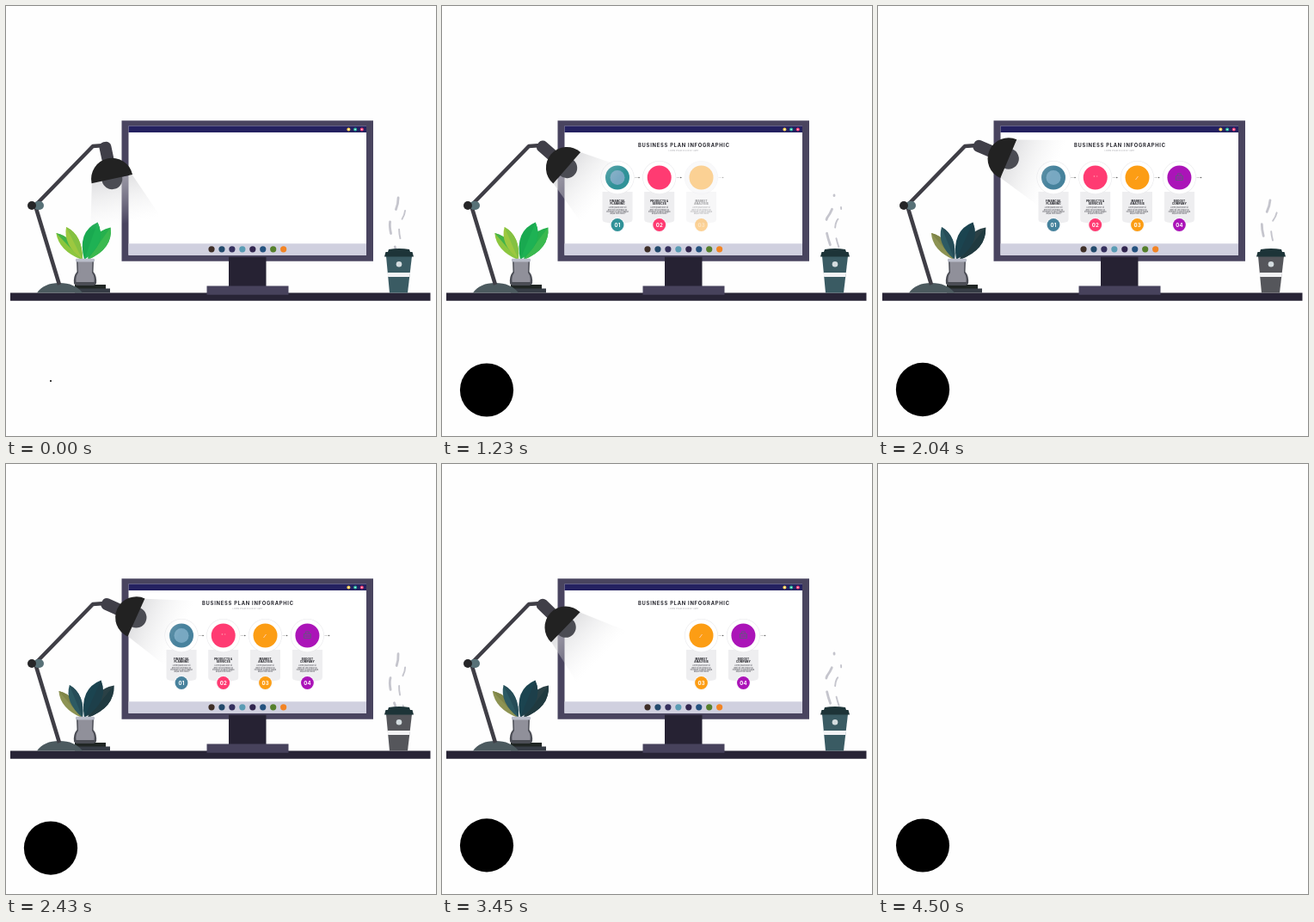
An HTML page with a canvas for the animation above (4.53 s loop, 500 by 500 pixels).

```html
<!DOCTYPE html>
<html lang="en">
<head>
<meta charset="utf-8">
<title>Desk with business plan</title>
<style>
html, body { margin: 0; width: 100%; height: 100%; overflow: hidden; background: #fefefe; }
canvas { display: block; }
</style>
</head>
<body>
<canvas id="stage" width="500" height="500"></canvas>
<script>
const ctx = document.getElementById('stage').getContext('2d');
const LOOP = 4530, CUT = 4485, TAU = Math.PI * 2;

const clamp = v => Math.max(0, Math.min(1, v));
const fade = (t, start, end) => clamp((t - start) / 240) * clamp(1 - (t - end) / 240);

// Smooth curve through [time, value] points, resting at both ends.
function curve(t, pts) {
  let i = 0;
  while (i < pts.length - 2 && t > pts[i + 1][0]) i++;
  const slope = k => k < 1 || k > pts.length - 2 ? 0
    : (pts[k + 1][1] - pts[k - 1][1]) / (pts[k + 1][0] - pts[k - 1][0]);
  const [t0, a] = pts[i], [t1, b] = pts[i + 1];
  const d = t1 - t0, u = clamp((t - t0) / d), v = 1 - u;
  return v * v * (1 + 2 * u) * a + u * u * (3 - 2 * u) * b
    + u * v * d * (v * slope(i) - u * slope(i + 1));
}

function rect(x, y, w, h, color, r = 0) {
  ctx.fillStyle = color;
  ctx.beginPath();
  ctx.roundRect(x, y, w, h, r);
  ctx.fill();
}
function disc(x, y, r, color) {
  ctx.fillStyle = color;
  ctx.beginPath();
  ctx.arc(x, y, r, 0, TAU);
  ctx.fill();
}
function shape(d, color) {
  ctx.fillStyle = color;
  ctx.fill(new Path2D(d));
}
function line(d, color, width) {
  ctx.strokeStyle = color;
  ctx.lineWidth = width;
  ctx.stroke(new Path2D(d));
}
function label(str, x, y, size, color, weight = 700, gap = 0) {
  ctx.font = `${weight} ${size}px Inter, sans-serif`;
  ctx.letterSpacing = gap + 'px';
  ctx.fillStyle = color;
  ctx.fillText(str, x + gap / 2, y);
}
function withAlpha(alpha, paint) {
  ctx.save();
  ctx.globalAlpha = alpha;
  if (alpha > 0) paint();
  ctx.restore();
}

const cards = [
  { x: 204, name: ['FINANCIAL', 'PLANNING'], color: '#45869c', start: 120, end: 2950 },
  { x: 252.7, name: ['PRODUCTS &', 'SERVICES'], color: '#ff3b72', start: 450, end: 3170 },
  { x: 301.5, name: ['MARKET', 'ANALYSIS'], color: '#fc9d14', start: 1125, end: 3570 },
  { x: 350.4, name: ['BUDGET', 'COMPANY'], color: '#ab14b8', start: 1680, end: 3860 }
];
const copy = ['Lorem ipsum dolor sit', 'amet elit sed tempor do', 'incididunt ut labore magna', 'aliqua enim minim'];
const appColors = ['#3f2f28', '#234a6c', '#35305e', '#5a9cb4', '#32264f', '#24527f', '#56802c', '#f28424'];

function card({ x, name, color }, i, t) {
  if (i === 0) {
    const mix = (a, b, d) => curve(t, [[690, a], [1230, b], [2040, d], [2820, d + 2]]);
    color = `rgb(${mix(50, 48, 70)},${mix(92, 146, 130)},${mix(140, 152, 156)})`;
  }
  shape(`M${x - 17.5} 216H${x + 17.5}V248Q${x + 17.5} 251 ${x + 14} 251.5L${x} 254L${x - 14} 251.5Q${x - 17.5} 251 ${x - 17.5} 248Z`, '#eeeef0');
  disc(x, 199.5, 19.5, '#e7e7ea');
  disc(x, 199.5, 19, '#fff');
  disc(x, 199.5, 14, color);
  if (i === 0) {
    const early = t < 960;
    disc(x, 199.5, 8.5, early ? '#2fa088' : '#78a8c2');
    if (early) {
      disc(x, 198.5, 3.2, '#8fc3bd');
      rect(x - 2.5, 201.5, 5, 2.5, '#8fc3bd', 1);
    }
  } else if (i === 3) {
    line(`M${x - 4} 197.5h8v5h-8zM${x - 2} 197v-2h4v2M${x - 4} 200h8`, '#6d4d86', 1);
  } else if (t > 1700) {
    line(i === 1 ? `M${x - 2} 198h1.5m2 0h1` : `M${x - 2} 202l3-4`, '#ffd9cf', .8);
  }
  disc(x, 254.5, 8.6, '#f8f8fa');
  disc(x, 254.5, 7.4, color);
  label('0' + (i + 1), x, 256.7, 6, '#fff', 700, .2);
  name.forEach((s, k) => label(s, x, 227.6 + k * 3.6, 3, '#26262c', 800, .15));
  copy.forEach((s, k) => label(s, x, 235.4 + k * 2.2, 2, '#55555c', 500));
  line(`M${x + 20} 199.5h4m1 0h1`, '#aaa', .5);
  disc(x + 25, 199.5, .7, '#555');
}

function monitor(t) {
  rect(5, 333.5, 488.5, 9.3, '#282436');
  rect(134.5, 133.3, 292.5, 163.5, '#49445f');
  rect(259, 291.7, 43.5, 35, '#262233');
  rect(233.5, 325.5, 95, 10.2, '#47425c');
  rect(142.5, 139.5, 276.5, 150.3, '#fff');
  rect(142.5, 139.5, 276.5, 7.5, '#242160');
  rect(142.5, 276.2, 276.5, 13.6, '#d0d0df');
  ['#ffd04a', '#22b89c', '#ff3b72'].forEach((c, i) => {
    disc(398.4 + i * 7.7, 143.5, 2, c);
    disc(398.4 + i * 7.7, 143.5, .7, '#fff');
  });
  appColors.forEach((c, i) => disc(239 + i * 11.95, 282.8, 3.6, c));

  withAlpha(fade(t, 100, 4200), () => {
    label('BUSINESS PLAN INFOGRAPHIC', 281, 163.5, 5.8, '#24242c', 700, .75);
    label('LOREM IPSUM DOLOR SIT AMET', 281, 169.2, 2.1, '#a8a8ae', 400, .1);
  });
  cards.forEach((c, i) => withAlpha(fade(t, c.start, c.end), () => card(c, i, t)));
}

// A leaf from its base to its tip, bulging by w on both sides.
function leaf(x, y, tx, ty, w, color, half) {
  const len = Math.hypot(tx - x, ty - y);
  const nx = (ty - y) / len * w, ny = (x - tx) / len * w;
  const mx = x + (tx - x) * .6, my = y + (ty - y) * .6;
  const side = s => `Q${mx + nx * s} ${my + ny * s} `;
  shape(`M${x} ${y}${side(1)}${tx} ${ty}${side(-1)}${x} ${y}`, color);
  shape(`M${x} ${y}${side(-1)}${tx} ${ty}Z`, half);
}

function plant(t) {
  const sway = k => 2 * Math.sin(t / LOOP * TAU - k);
  const dim = (t > 1800 && t < 2450) || t > 3150;
  const [left, inner, mid, right] = dim
    ? [['#8d9353', '#7f8548'], ['#2d5a63', '#264d58'], ['#1b4450', '#1d3f4a'], ['#2a4045', '#203a40']]
    : [['#8cc63f', '#41b349'], ['#9dc840', '#84c141'], ['#19a950', '#1eb254'], ['#25b04d', '#3ab94f']];
  leaf(88, 295, 60 + sway(1), 264, 12, ...left);
  leaf(89, 295, 72 + sway(1.4), 257, 13, ...inner);
  leaf(95, 295, 123.5 + sway(1.8), 257.5, 17, ...right);
  leaf(91, 295, 108.5 + sway(1.6), 251.5, 19, ...mid);
  rect(80, 324, 36, 5, '#202624');
  rect(80, 328.5, 41, 5, '#363c45');
  shape('M82 296L82.5 309Q78 314 79 323L82 325H102L105 323Q106 314 101.5 309L102 296Z', '#4b4d55');
  shape('M83.5 296L84 310Q80.5 315 81.5 321H102.5Q103.5 315 100 310L100.5 296Z', '#90909a');
  rect(81, 293.8, 22, 3.8, '#babdca', 1);
}

function lamp(t) {
  const angle = curve(t, [[0, -12], [690, -27], [1230, -49], [2040, -67], [2820, -60], [3450, -46], [LOOP, -12]]);
  shape('M36 333.5Q44 322 62 322Q80 322 89 333.5Z', '#4c5a5f');
  line('M62 324L34 232L101 163L115 162', '#3f3e46', 4.5);
  rect(32, 227, 12, 10, '#587177', 5);
  disc(30, 232, 5, '#262628');

  ctx.save();
  ctx.translate(115, 162);
  ctx.rotate(angle * Math.PI / 180);
  const glow = ctx.createLinearGradient(0, 40, 0, 94);
  glow.addColorStop(0, 'rgba(205,205,208,.6)');
  glow.addColorStop(1, 'rgba(235,235,236,0)');
  shape('M-24 40H24L46 94H-37Z', glow);
  rect(-7, -4, 14, 26, '#403f48', 6);
  disc(0, 40, 12, '#4b4c53');
  shape('M-24.3 40A24.3 24.3 0 0 1 24.3 40Z', '#222222');
  ctx.restore();
}

function steam(d, width, on, period, offset, t) {
  ctx.setLineDash([on, period - on]);
  ctx.lineDashOffset = offset - t / LOOP * 2 * period;
  line(d, '#c5c5cd', width);
  ctx.setLineDash([]);
}

function cup(t) {
  const gray = t > 1800 && t < 2450;
  ctx.lineCap = 'round';
  steam('M453 282Q443 256 448 246Q457 234 456 220', 2.8, 14, 30, 12, t);
  steam('M462 282Q454 260 459 250Q465 242 464 234', 1.9, 10.5, 23.2, 11, t);
  ctx.lineCap = 'butt';
  shape('M442 291H472L467 333.5H446Z', gray ? '#55565b' : '#3a5b63');
  shape('M443.5 310H470L469.4 315H444.2Z', '#f2f2f4');
  shape('M445 283Q457 281 469 283L470 286H472.5L474 291.5H440L441.5 286H444Z', '#1d3438');
  disc(457, 300.3, 3.3, '#d4dcdf');
}

function draw(t) {
  rect(0, 0, 500, 500, '#fefefe');
  if (t < CUT) {
    monitor(t);
    plant(t);
    lamp(t);
    cup(t);
  }
  const r = curve(t, [[0, 1], [300, 21], [540, 28], [690, 30], [930, 31], [LOOP, 31]]);
  const y = t < 690 ? 436
    : curve(t, [[690, 436], [930, 453], [1230, 446.5], [2040, 446], [2820, 446.8], [3450, 443.4], [LOOP, 443.6]]);
  disc(52, y, r, '#000');
}

ctx.textAlign = 'center';
ctx.lineJoin = 'round';
const begin = performance.now();
(function tick() {
  draw((performance.now() - begin) % LOOP);
  requestAnimationFrame(tick);
})();
</script>
</body>
</html>
```
